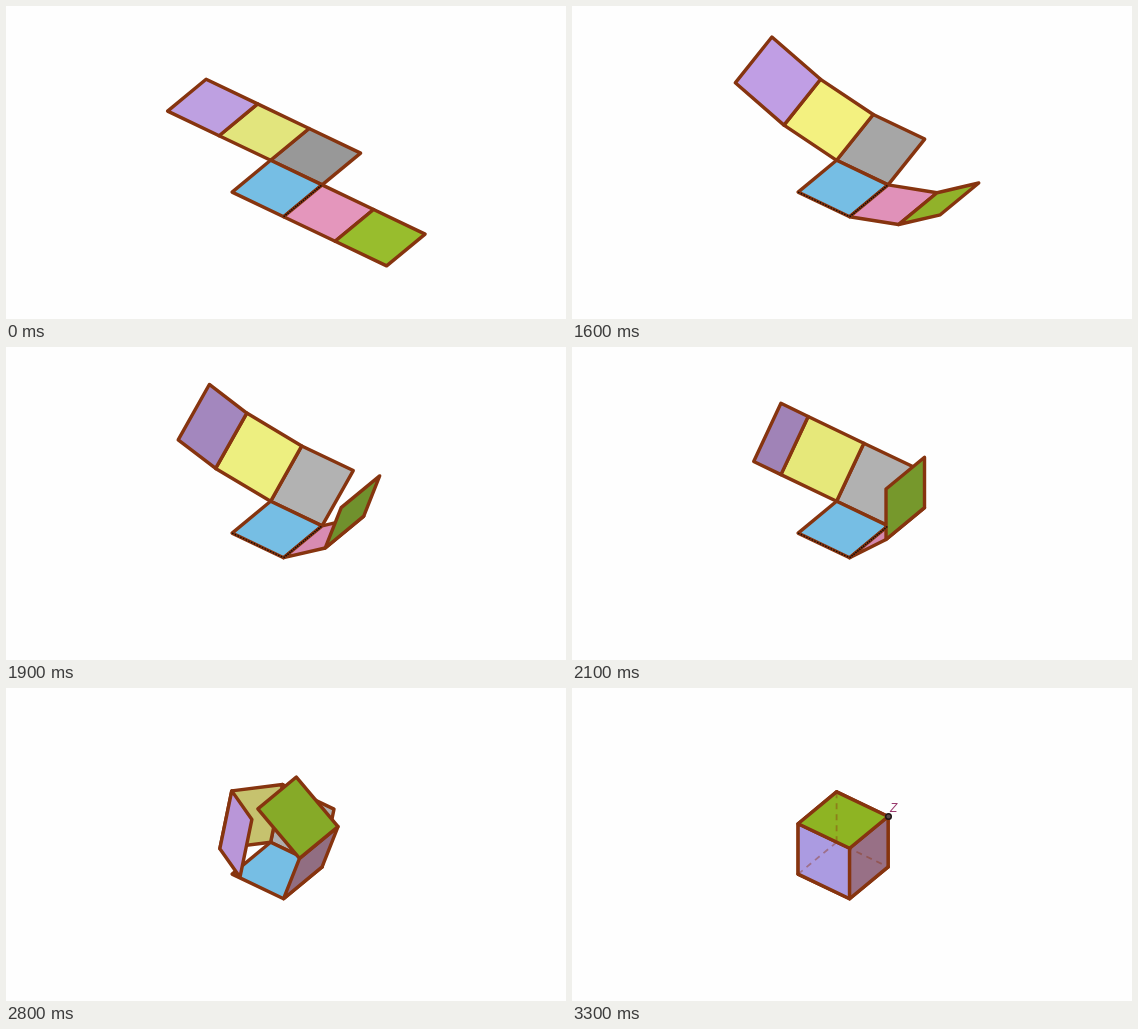
An HTML page with a canvas for the animation above (4.5 s loop, 560 by 313 pixels).

```html
<!DOCTYPE html>
<html lang="en">
<head>
<meta charset="utf-8">
<title>Cube net folding</title>
<style>
  html, body { margin: 0; width: 100%; height: 100%; overflow: hidden; background: #fefefe; }
  canvas { display: block; }
</style>
</head>
<body>
<canvas id="stage" width="560" height="313"></canvas>
<script>
const ctx = document.getElementById('stage').getContext('2d');
const LOOP = 4500;
const STEPS = [1400, 1600, 1800, 1900, 2100, 2300, 2400, 2800, 3000, 3300];
const EDGE = '#86340f';

// Projected axes: u along the row, v towards the viewer, w up
const U = [51.5, 24.6], V = [-38.5, 31.8], W = [0, -50.4];
const B = [264.6, 154.3];

// Colour stops per face: fold step -> colour
const TINTS = {
  blue:   { 0: '#76bee4' },
  grey:   { 0: '#989898', 1: '#a0a0a0', 4: '#b2b2b2', 10: '#aeaeae' },
  yellow: { 0: '#e2e57d', 1: '#eded80', 2: '#f3f180', 4: '#edef80', 7: '#d7d96e', 8: '#c6c26e' },
  purple: { 0: '#bea0e1', 1: '#c5a2e8', 2: '#c09ee4', 4: '#a387be', 7: '#9a7aa8', 8: '#b996d8', 10: '#ab9be1' },
  pink:   { 0: '#e496bc', 2: '#e091b9', 5: '#d488ae', 6: '#966978', 8: '#916e82', 10: '#987086' },
  green:  { 0: '#98bd2d', 2: '#91b22a', 3: '#74942d', 4: '#70912d', 7: '#82a52a', 10: '#8eb423' }
};

const add = (p, q) => [p[0] + q[0], p[1] + q[1]];
const mix = (p, a, q, b) => [p[0] * a + q[0] * b, p[1] * a + q[1] * b];
const rgb = hex => [1, 3, 5].map(i => parseInt(hex.slice(i, i + 2), 16));

function tint(name, step) {
  const stops = TINTS[name];
  const keys = Object.keys(stops).map(Number);
  const lo = Math.max(...keys.filter(k => k <= step));
  const next = keys.filter(k => k > step);
  if (!next.length) return stops[lo];
  const hi = Math.min(...next), f = (step - lo) / (hi - lo);
  const a = rgb(stops[lo]), b = rgb(stops[hi]);
  return `rgb(${a.map((c, i) => Math.round(c + (b[i] - c) * f)).join()})`;
}

function face(name, step, origin, a, b) {
  const far = add(origin, a);
  ctx.beginPath();
  ctx.moveTo(...origin);
  ctx.lineTo(...far);
  ctx.lineTo(...add(far, b));
  ctx.lineTo(...add(origin, b));
  ctx.closePath();
  ctx.fillStyle = tint(name, step);
  ctx.fill();
  ctx.strokeStyle = EDGE;
  ctx.lineWidth = 3.4;
  ctx.stroke();
}

function dashed(p, q, dash, color, width) {
  ctx.save();
  ctx.setLineDash(dash);
  ctx.strokeStyle = color;
  ctx.lineWidth = width;
  ctx.beginPath();
  ctx.moveTo(...p);
  ctx.lineTo(...q);
  ctx.stroke();
  ctx.restore();
}

function drawFolded(A, C) {
  const hidden = 'rgba(138, 52, 15, 0.42)';
  for (const p of [add(B, W), A, C]) dashed(B, p, [6, 5], hidden, 1.8);

  const [x, y] = add(C, W);
  ctx.beginPath();
  ctx.arc(x + 0.4, y, 2.8, 0, Math.PI * 2);
  ctx.fillStyle = '#5a4a48';
  ctx.fill();
  ctx.strokeStyle = '#1c1414';
  ctx.lineWidth = 1.4;
  ctx.stroke();

  ctx.fillStyle = '#98386c';
  ctx.font = 'italic 12px "Liberation Sans", sans-serif';
  ctx.fillText('Z', 318, 124);
}

function draw(step) {
  const angle = step * Math.PI / 20;
  const c = Math.cos(angle), s = Math.sin(angle);
  const c2 = Math.cos(2 * angle), s2 = Math.sin(2 * angle);
  const A = add(B, V), C = add(B, U), D = add(A, U);

  // Grey wall direction and its inward normal
  const wall = mix(V, -c, W, s), inward = mix(W, c, V, s);
  const yellow = mix(U, -c, inward, s), purple = mix(U, -c2, inward, s2);
  const pink = mix(U, c, W, s), green = mix(U, c2, W, s2);

  ctx.fillStyle = '#fefefe';
  ctx.fillRect(0, 0, 560, 313);
  ctx.lineJoin = 'round';

  face('grey', step, B, U, wall);
  face('yellow', step, B, yellow, wall);
  face('blue', step, B, U, V);
  face('purple', step, add(B, yellow), purple, wall);
  face('pink', step, C, pink, V);
  face('green', step, add(C, pink), green, V);

  if (step < 6) dashed(D, C, [1.5, 1], '#140c08', 1.6);
  if (step > 0 && step < 6) dashed(A, D, [1.5, 1.5], '#140c08', 1.3);
  if (step === STEPS.length) drawFolded(A, C);
}

const start = performance.now();
function tick() {
  const t = (performance.now() - start) % LOOP;
  draw(STEPS.filter(at => at <= t).length);
  requestAnimationFrame(tick);
}
tick();
</script>
</body>
</html>
```
